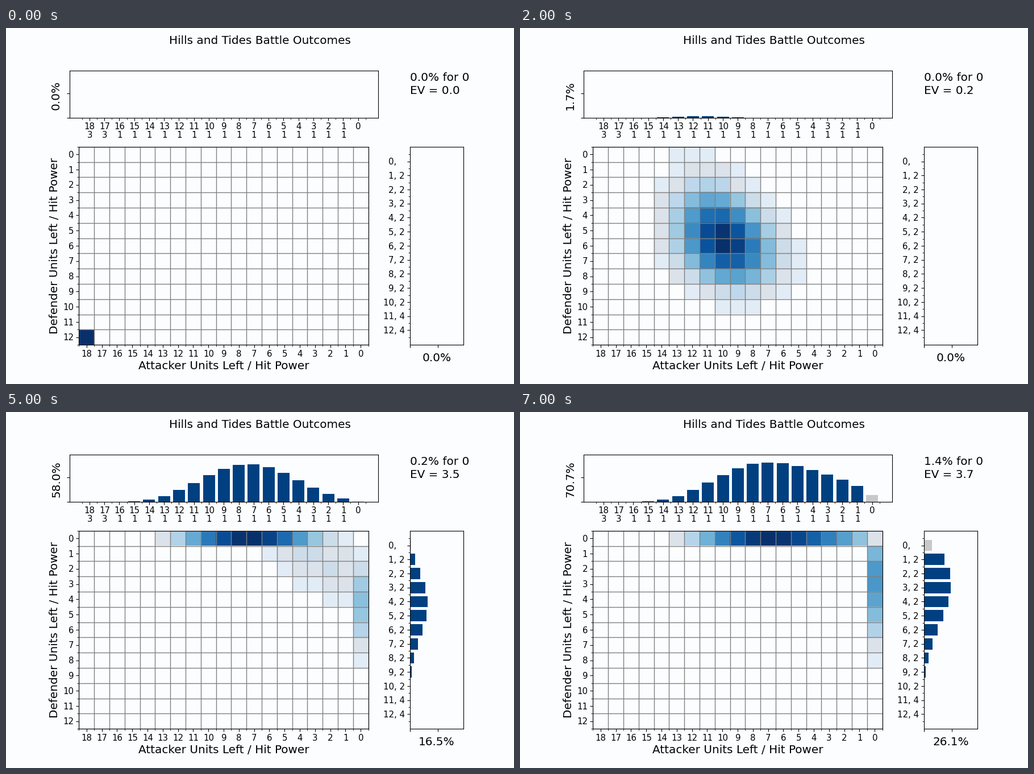
Recreate the animation shown at these times as a matplotlib script. Size 894 px wide and 626 px high, loop 8000 ms.

```python
import matplotlib.pyplot as plt
import numpy as np
from matplotlib.animation import FuncAnimation
from matplotlib.colors import to_rgb

W, H, DPI = 894, 626, 100
BG, NAVY, SILVER = "#fcfdff", "#004080", "#c8c8c8"
ROUNDS = 8

# Hit power per unit, strongest first; the weakest units are lost first.
ATT = [3] * 2 + [1] * 16
DEF = [4] * 2 + [2] * 10
NA, ND = len(ATT), len(DEF)


def hits(powers):
    """Distribution of hits when every unit rolls one die."""
    dist = np.ones(1)
    for power in powers:
        dist = np.convolve(dist, [1 - power / 6, power / 6])
    return dist


def survivors(n, dist):
    left = np.zeros(n + 1)
    for h, prob in enumerate(dist):
        left[max(n - h, 0)] += prob
    return left


def clash(a, d):
    """Outcomes of one round; a round without any hit is rolled again."""
    odds = np.outer(survivors(a, hits(DEF[:d])), survivors(d, hits(ATT[:a])))
    odds[a, d] = 0
    return odds / odds.sum()


def fight(state):
    """Play one round from a grid of P[attackers, defenders]."""
    after = np.zeros_like(state)
    for (a, d), prob in np.ndenumerate(state):
        if a == 0 or d == 0:
            after[a, d] += prob
        elif prob > 0:
            after[:a + 1, :d + 1] += prob * clash(a, d)
    return after


start = np.zeros((NA + 1, ND + 1))
start[NA, ND] = 1
states = [start]
for _ in range(ROUNDS - 1):
    states.append(fight(states[-1]))


def shade(state):
    """Colours of the grid, with the palest tones in flat bands."""
    ratio = state[::-1].T / state.max()
    rgb = plt.get_cmap("Blues")(ratio)[..., :3]
    bands = [(0.26, "#cddce9"), (0.20, "#dce2ea"), (0.125, "#e1ecf6"), (0.075, BG)]
    for limit, color in bands:
        rgb[ratio < limit] = to_rgb(color)
    return rgb


plt.rcParams["font.family"] = "DejaVu Sans"
fig = plt.figure(figsize=(W / DPI, H / DPI), dpi=DPI, facecolor=BG)


def panel(left, top, right, bottom):
    ax = fig.add_axes([left / W, 1 - bottom / H, (right - left) / W, (bottom - top) / H])
    ax.set_facecolor(BG)
    ax.tick_params(labelbottom=False, labelleft=False)
    return ax


def label(x, y, text, px=20, ha="center", rotation=0):
    """Text with its baseline at a pixel position."""
    return fig.text(x / W, 1 - y / H, text, fontsize=px * 72 / DPI, ha=ha,
                    va="baseline", rotation=rotation, rotation_mode="anchor")


def halves(n):
    return np.arange(-0.5, n + 1)


cols, rows = np.arange(NA + 1), np.arange(ND + 1)
LEFT, TOP, BOTTOM = 128.45, 208.8, 557.14
CELL = (BOTTOM - TOP) / (ND + 1)

# Outcome grid
grid = panel(LEFT, TOP, LEFT + CELL * (NA + 1), BOTTOM)
image = grid.imshow(shade(start), extent=(-0.5, NA + 0.5, ND + 0.5, -0.5),
                    aspect="auto", interpolation="nearest")
grid.set_xticks(cols)
grid.set_yticks(rows)
grid.set_xticks(halves(NA), minor=True)
grid.set_yticks(halves(ND), minor=True)
grid.grid(which="minor", color="gray", linewidth=1)

# Attacker wins
top = panel(111.75, 75.12, 654.8, 158.4)
top_bars = top.bar(cols, np.zeros(NA + 1), color=[NAVY] * NA + [SILVER])
top.set_xlim(-1.34, NA + 1.34)
top.set_ylim(0, 0.095)
top.set_xticks(cols)
top.set_xticks(halves(NA), minor=True)
top.set_yticks([0, 0.05])

# Defender wins
side = panel(711.2, TOP, 804.6, BOTTOM)
side_bars = side.barh(rows, np.zeros(ND + 1), color=[SILVER] + [NAVY] * ND)
side.set_xlim(0, 0.0955)
side.set_ylim(ND + 1.04, -1.04)
side.set_yticks(rows)
side.set_yticks(halves(ND), minor=True)
side.set_xticks([0, 0.05])

# Tick labels
for c in cols:
    units = NA - c
    x = 147.3 + 26.26 * c
    label(x, 178.5, str(units), 15)
    if units:
        label(x, 193.3, str(ATT[c]), 15)
    label(LEFT + CELL * (c + 0.5) + 0.3, 577.5, str(units), 15)
for d in rows:
    label(119, TOP + CELL * (d + 0.5) + 5.6, str(d), 15, "right")
    y = 240.1 + 24.75 * d
    if d:
        label(702, y, f"{d}, {DEF[ND - d]}", 15, "right")
    else:
        label(673.5, y, "0,", 15, "left")

label(447, 28, "Hills and Tides Battle Outcomes")
label(383.5, 600, "Attacker Units Left / Hit Power")
label(91, 383, "Defender Units Left / Hit Power", rotation=90)
att_text = label(94, 118.5, "", rotation=90)
def_text = label(758, 586.5, "")
draw_text = label(711, 93, "", ha="left")
ev_text = label(711, 116, "", ha="left")


def update(i):
    state = states[i]
    att, dfn = state[:, 0], state[0]
    image.set_data(shade(state))
    for bar, prob in zip(top_bars, att[::-1]):
        bar.set_height(prob)
    for bar, prob in zip(side_bars, dfn):
        bar.set_width(prob)
    ev = att @ np.arange(NA + 1) - dfn @ rows
    att_text.set_text(f"{att[1:].sum():.1%}")
    def_text.set_text(f"{dfn[1:].sum():.1%}")
    draw_text.set_text(f"{state[0, 0]:.1%} for 0")
    ev_text.set_text(f"EV = {ev:.1f}")
    return []


anim = FuncAnimation(fig, update, frames=ROUNDS, interval=1000, repeat=True,
                     repeat_delay=0, blit=False)
plt.show()
```
